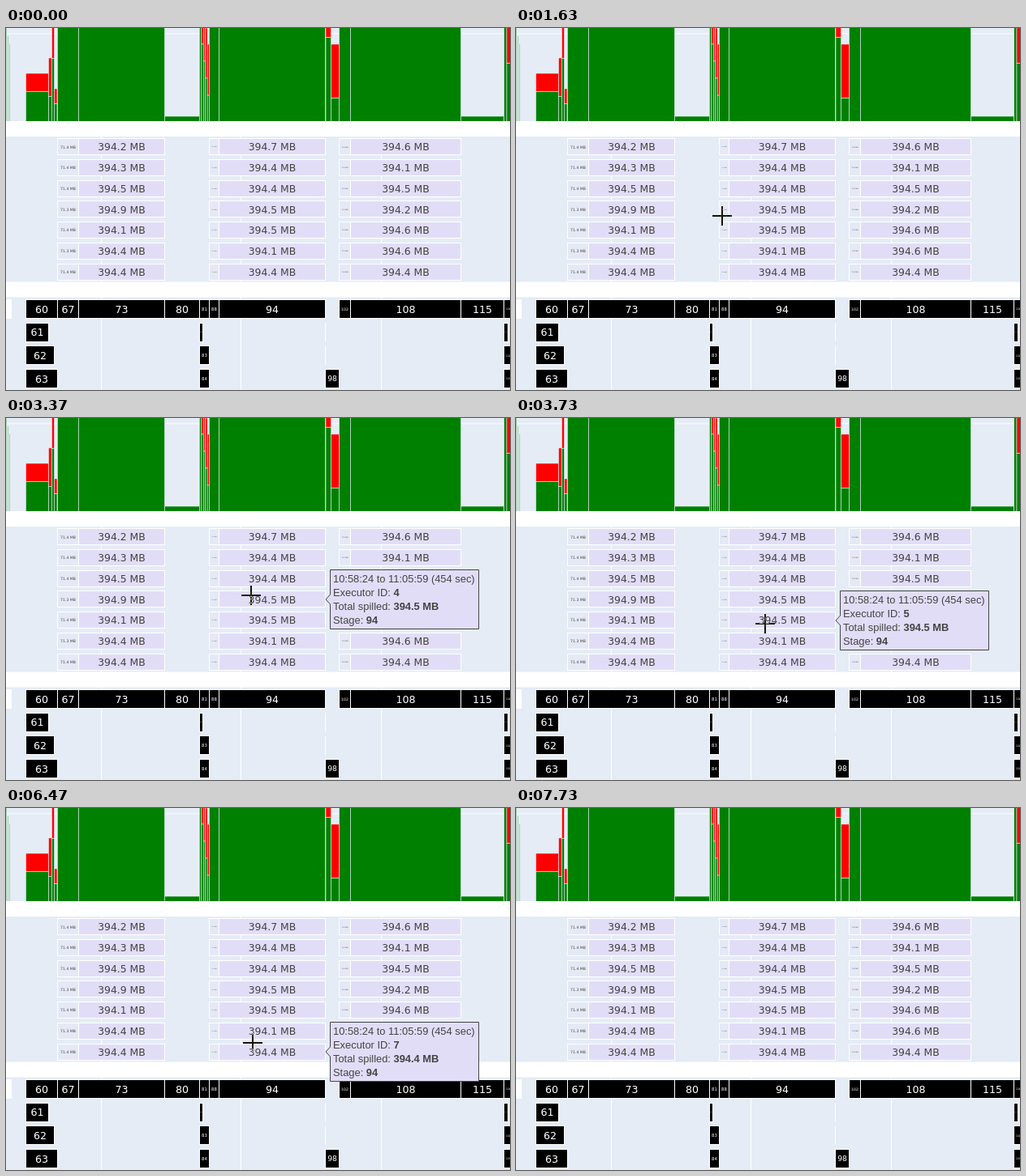
Animation of 621 by 447 pixels, one loop 8710 ms. Source, as an HTML page:

```html
<!DOCTYPE html>
<html lang="en">
<head>
<meta charset="utf-8">
<title>Executor spill timeline</title>
<style>
html, body { margin: 0; width: 100%; height: 100%; overflow: hidden; background: #fff; }
svg { display: block; font-family: "DejaVu Sans", sans-serif; }
#tip text { font: 12.9px "Liberation Sans", Arial, sans-serif; fill: #444; }
#tip .b { font-weight: bold; }
#cross { mix-blend-mode: difference; }
</style>
</head>
<body>
<svg id="stage" width="621" height="447" viewBox="0 0 621 447"></svg>
<script>
const LOOP = 8710, BG = '#e5ecf6', LILAC = '#e2ddf7';
const PITCH = 25.72, ROW0 = 146.8, LANE = 28.6;

// Stage boundaries are shared by all three charts
const edges = [24.5, 63.5, 89.5, 195.5, 238.5, 250.5, 262.5, 393.5, 410.5, 424.5, 560.5, 613.5, 625];
const ids = [60, 67, 73, 80, 81, 88, 94, 98, 102, 108, 115, 116];
const spills = ['2359144', '7445514', '6152664'];   // last digit of each 394.x label
let out = '';

function rect(x0, y0, x1, y1, fill, line = 'none', width = 1) {
  out += `<rect x="${x0}" y="${y0}" width="${x1 - x0}" height="${y1 - y0}" fill="${fill}" stroke="${line}" stroke-width="${width}"/>`;
}

// Box whose label shrinks to fit its width
function box(x0, x1, y, h, s, max, ink, fill) {
  const top = Math.floor(y - h / 2) + .5;
  const fit = (x1 - x0 - 5) / (String(s).length * .65);
  const size = Math.max(1.5, Math.min(max, fit));
  rect(x0, top, x1, top + h, fill, '#fff');
  out += `<text x="${(x0 + x1) / 2}" y="${Math.round(y + .37 * size)}" font-size="${size}" fill="${ink}" text-anchor="middle">${s}</text>`;
}

function bar(x0, x1, green, red = green) {
  if (green > red) rect(x0, red, x1, green, '#f00', BG, .6);
  rect(x0, green, x1, 117, 'green', BG, .6);
}

// Neighbouring bars: each starts where the one before ends
function bars(end, ...list) {
  list.forEach(([x, red, green], i) => bar(x, i + 1 < list.length ? list[i + 1][0] : end, green, red));
}

// Panels and grid
rect(0, 0, 621, 447, BG);
rect(0, 6.5, 621, 7.5, '#fff');
[117.5, 289.5, 462.5].forEach(x => rect(x - .5, 0, x + .5, 447, '#fff'));

// Top chart
for (let i = 0; i < 3; i++) rect(i * 2, i * 10, i * 2 + 1, 115, '#a5cfae');
ids.forEach((id, i) => {
  if (![60, 81, 98, 116].includes(id)) bar(edges[i], edges[i + 1], id === 80 || id === 115 ? 109 : -1);
});
bars(63, [24.5, 56, 78.5], [52.5, 37, 84.5], [56.5, -1, 37.5], [59.5, 75, 93.5]);
bars(410.5, [394, -1, 11.5], [400.5, 20, 86.5]);
bars(625, [613.7, -1, -1], [617, -1, 43.5]);
for (let i = 0; i < 5; i++) {
  const x = 238.5 + i * 2.4;
  bar(x, x + 2.4, i * 21 - 1, Math.max(-1, i * 20 - 60));
}
rect(0, 115, 621, 134, '#fff');
rect(0, 313.5, 621, 332.5, '#fff');

// Middle chart
spills.forEach((digits, col) => {
  const k = [1, 5, 8][col];
  [...digits].forEach((d, i) => {
    const y = ROW0 + i * PITCH;
    box(edges[k], edges[k + 1], y, 20, `71.${i === 3 || i === 5 ? 3 : 4} MB`, 12.4, '#444', '#e5e9f6');
    box(edges[k + 1], edges[k + 2], y, 20, `394.${d} MB`, 12.4, '#444', LILAC);
  });
});

// Bottom chart
function stage(lane, x0, x1, id) {
  box(x0, x1, 347.2 + lane * LANE, 23, id, 12.6, '#fff', '#000');
}
rect(0, 335, 7, 359, '#fff');
ids.forEach((id, i) => stage(id === 98 ? 3 : 0, edges[i], edges[i + 1], id));
[[60, 24.5, 52.5, 59.5, 63.5], [81, 238.5, 242.5, 250.5, 250.5], [116, 613.5, 618.5, 625, 625]].forEach(([id, x, ...ends]) =>
  ends.forEach((end, i) => stage(i + 1, x, end, id + i + 1)));
[1, 2].forEach(r => rect(393, 335.5 + r * LANE, 394, 358.5 + r * LANE, '#fff'));

out += `<g id="tip">
<path d="M394 0L399.5 -6V-36.5H582.5V36.5H399.5V6Z" fill="${LILAC}" stroke="#444"/>
<text x="403" y="-21">10:58:24 to 11:05:59 (454 sec)</text>
<text x="403" y="-4">Executor ID: <tspan class="b" id="exec"></tspan></text>
<text x="403" y="13">Total spilled: <tspan class="b" id="total"></tspan></text>
<text x="403" y="30">Stage: <tspan class="b">94</tspan></text></g>
<path id="cross" d="M-12 0H12M0 -12V12" stroke="#fff" stroke-width="2"/>`;

const $ = id => document.getElementById(id);
$('stage').innerHTML = out;

// Cursor moves after the entry: start, end, target
const moves = [[3370, 3730, 307, 254], [4870, 5200, 303, 278], [6370, 6600, 305, 307], [7570, 7730, 203, 468]];
const part = (t, a, b) => Math.min(1, Math.max(0, (t - a) / (b - a)));

function cursorAt(t) {
  const s = 1 - (1 - part(t, 1030, 1910)) ** 1.6;
  let x = 302 * s, y = 384 - 165 * (1 - (1 - s) ** 1.4);
  for (const [a, b, tx, ty] of moves) {
    const q = part(t, a, b), k = q * q * (3 - 2 * q);
    x += (tx - x) * k;
    y += (ty - y) * k;
  }
  return [Math.round(x), Math.round(y)];
}

function draw(now) {
  const t = now % LOOP;
  const shown = t >= 1030 && t < 7730;
  const [x, y] = cursorAt(t);
  const row = Math.round((y - ROW0) / PITCH);
  const hover = shown && x >= 263 && x <= 393 && row >= 0 && row < 7;
  $('cross').style.display = shown ? '' : 'none';
  $('cross').setAttribute('transform', `translate(${x} ${y})`);
  $('tip').style.display = hover ? '' : 'none';
  if (hover) {
    $('tip').setAttribute('transform', `translate(0 ${Math.round(ROW0 + row * PITCH)})`);
    $('exec').textContent = row + 1;
    $('total').textContent = `394.${spills[1][row]} MB`;
  }
  requestAnimationFrame(draw);
}
draw(performance.now());
</script>
</body>
</html>
```
